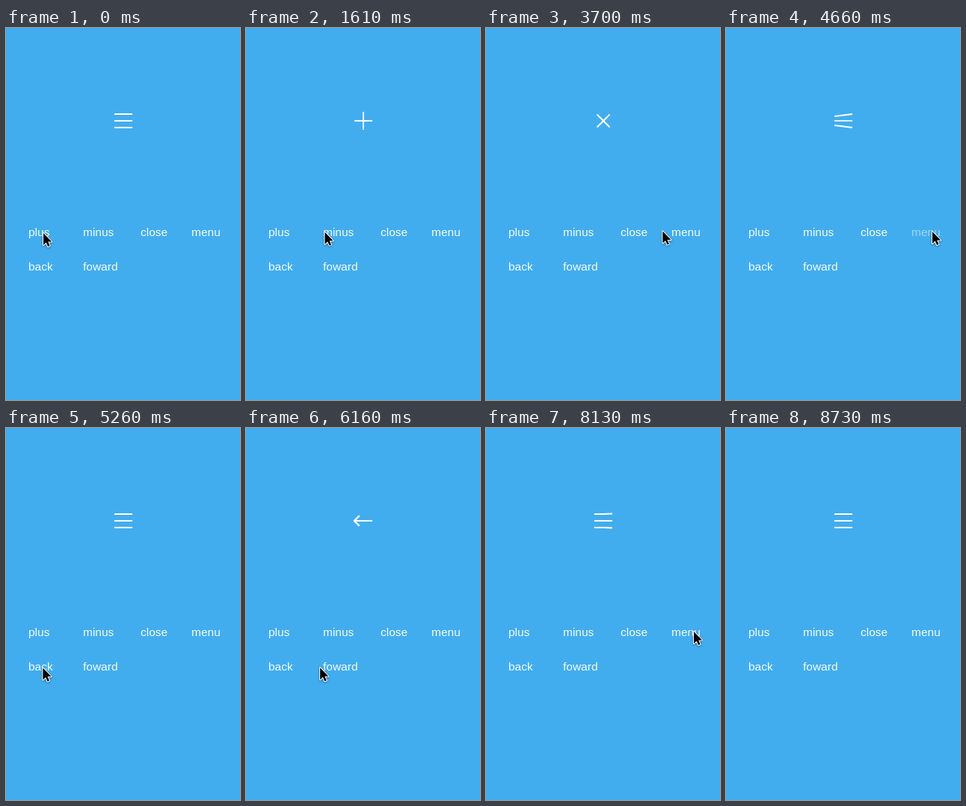
An HTML page with a canvas that plays this animation: 313x497 px, repeating every 9.46 s.

```html
<!DOCTYPE html>
<html lang="en">
<head>
<meta charset="utf-8">
<title>Morphing icon button</title>
<style>
  html, body { margin: 0; width: 100%; height: 100%; overflow: hidden; background: #42adee; }
  canvas { display: block; }
</style>
</head>
<body>
<canvas id="stage" width="313" height="497"></canvas>
<script>
const ctx = document.getElementById('stage').getContext('2d');
const LOOP = 9460;

const LABELS = {
  plus: [30, 278], minus: [103, 278], close: [180, 278], menu: [248, 278],
  back: [30, 324], foward: [103, 324]
};

// Each bar is two halves on a joint: [joint x, joint y, left angle, right angle, half length].
const BARS = {
  menu: [0, -9, 180, 0, 12],
  plus: [0, 0, 270, 90, 12],
  minus: [0, 0, 180, 0, 12],
  close: [0, 0, 135, -45, 12],
  back: [-12.2, 0, 315, 45, 9.6],
  foward: [12.2, 0, 225, 135, 9.6]
};
const hasMiddle = { menu: 1, back: 1, foward: 1 };

// Each tap, and where the pointer glides afterwards (lift bends the path).
const TAPS = [
  { icon: 'plus', press: 960, release: 1080, to: [118, 271], lift: 2 },
  { icon: 'minus', press: 2090, release: 2270, to: [200, 271], lift: 0 },
  { icon: 'close', press: 3220, release: 3340, to: [276, 272], lift: 0 },
  { icon: 'menu', press: 4420, release: 4540, to: [47, 321], lift: 0 },
  { icon: 'back', press: 5560, release: 5680, to: [118, 321], lift: -1 },
  { icon: 'foward', press: 6700, release: 6820, to: [278, 272], lift: -14 },
  { icon: 'menu', press: 7660, release: 7840 }
];
const POINTER_START = [50, 274];
const EXIT = 8150;

const clamp = v => Math.max(0, Math.min(1, v));
const mix = (a, b, p) => a + (b - a) * p;

function spring(ms) {
  if (ms <= 0) return 0;
  const s = ms / 1000, damping = 15, speed = 11;
  return 1 - Math.exp(-damping * s) *
    (Math.cos(speed * s) + damping / speed * Math.sin(speed * s));
}

function labelAlpha(name, t) {
  let alpha = 1;
  for (const tap of TAPS) {
    if (tap.icon === name && t >= tap.press) {
      alpha = t < tap.release ? 0.2 : mix(0.2, 1, clamp((t - tap.release) / 300));
    }
  }
  return alpha;
}

function drawLabels(t) {
  ctx.font = '15.5px "Liberation Sans", Arial, sans-serif';
  ctx.fillStyle = '#fff';
  for (const [name, [x, y]] of Object.entries(LABELS)) {
    ctx.globalAlpha = 0.94 * labelAlpha(name, t);
    ctx.fillText(name, x, y);
  }
  ctx.globalAlpha = 1;
}

function drawBar(from, to, p, flip) {
  const [x, y, left, right, length] = from.map((v, i) => mix(v, to[i], p));
  const tip = angle => {
    const a = angle * Math.PI / 180;
    return [x + length * Math.cos(a), flip * (y + length * Math.sin(a))];
  };
  ctx.beginPath();
  ctx.moveTo(...tip(left));
  ctx.lineTo(x, flip * y);
  ctx.lineTo(...tip(right));
  ctx.stroke();
}

function drawIcon(t) {
  let from = 'menu', to = 'menu', start = 0;
  for (const tap of TAPS) {
    if (t >= tap.release - 20) {
      from = to;
      to = tap.icon;
      start = tap.release - 20;
    }
  }
  const p = spring(t - start);
  const lower = name => BARS[name === 'plus' ? 'minus' : name];

  ctx.save();
  ctx.translate(157, 124);
  ctx.strokeStyle = '#fff';
  ctx.lineWidth = 2;
  ctx.lineJoin = 'round';
  drawBar(BARS[from], BARS[to], p, 1);
  drawBar(lower(from), lower(to), p, -1);
  ctx.globalAlpha = clamp(mix(hasMiddle[from] || 0, hasMiddle[to] || 0, p));
  drawBar(BARS.minus, BARS.minus, 0, 1);
  ctx.restore();
}

function pointerAt(t) {
  let [x, y] = POINTER_START;
  for (const { release, to, lift } of TAPS) {
    if (!to) continue;
    const u = clamp((t - release - 200) / 580);
    const p = 1 - (1 - u) ** 2;
    x = mix(x, to[0], p);
    y = mix(y, to[1], p) + lift * Math.sin(Math.PI * p);
  }
  const out = Math.max(0, (t - EXIT) / 550) ** 2.1;
  return [x - 40 * out, y + 225 * out];
}

function drawPointer(t) {
  if (t >= 8730) return;
  ctx.save();
  ctx.translate(...pointerAt(t));
  const shape = new Path2D('M0 0V16L3.7 12.6 6.1 18 8.6 17 6.2 11.6H11.2Z');
  ctx.lineJoin = 'round';
  ctx.lineWidth = 2;
  ctx.strokeStyle = '#fff';
  ctx.shadowColor = 'rgba(0,0,0,.4)';
  ctx.shadowBlur = 3;
  ctx.shadowOffsetY = 1;
  ctx.stroke(shape);
  ctx.shadowColor = 'transparent';
  ctx.fillStyle = '#000';
  ctx.fill(shape);
  ctx.restore();
}

function frame() {
  const t = performance.now() % LOOP;
  ctx.fillStyle = '#42adee';
  ctx.fillRect(0, 0, 313, 497);
  drawLabels(t);
  drawIcon(t);
  drawPointer(t);
  requestAnimationFrame(frame);
}
frame();
</script>
</body>
</html>
```
